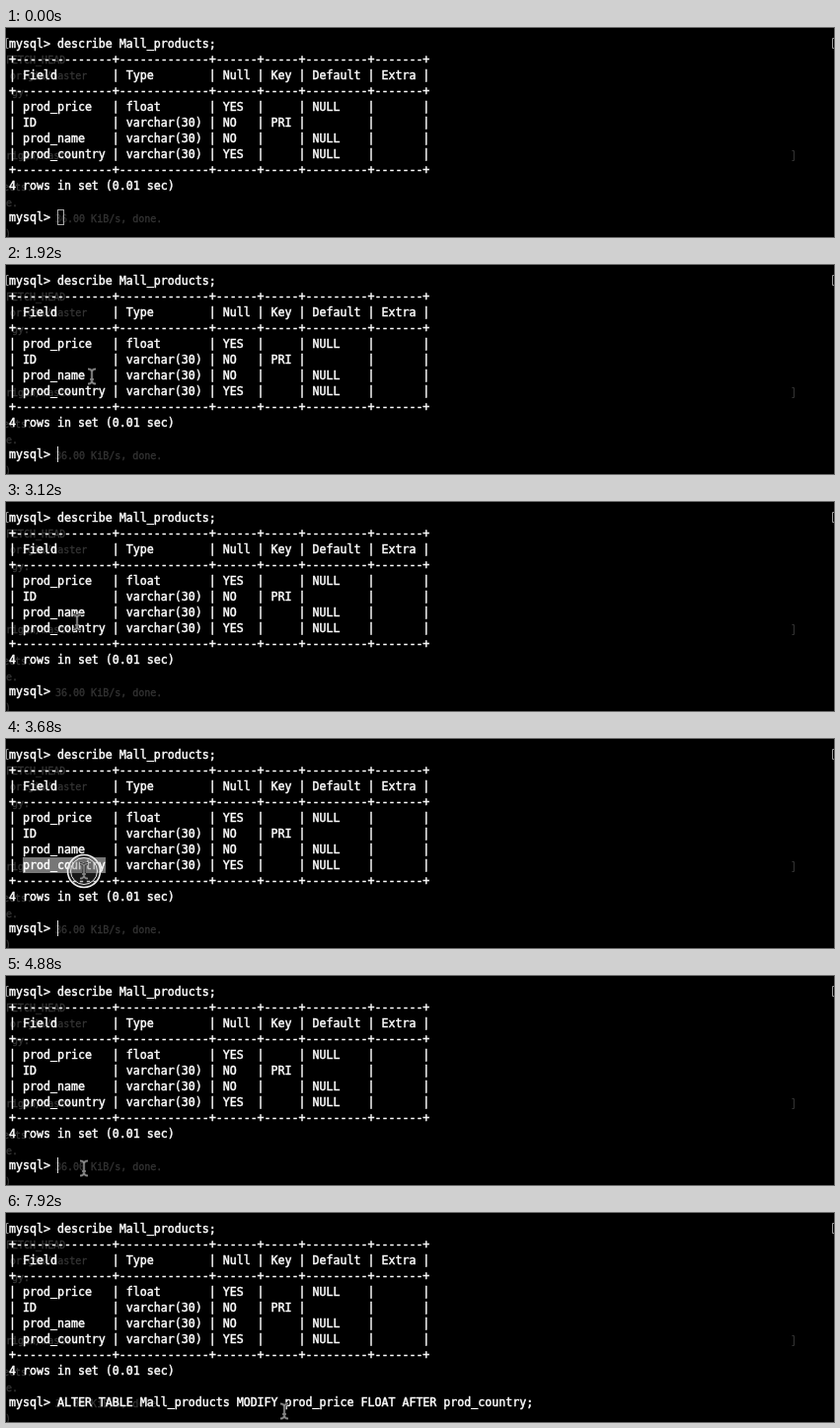
Animation of 839 by 212 pixels, one loop 8000 ms. Source, as an HTML page with a canvas:

```html
<!DOCTYPE html>
<html lang="en">
<head>
<meta charset="utf-8">
<title>Terminal</title>
<style>
  html, body { margin: 0; width: 100%; height: 100%; overflow: hidden; background: #000; }
  canvas { display: block; }
</style>
</head>
<body>
<canvas id="stage" width="839" height="212"></canvas>
<script>
const ctx = document.getElementById('stage').getContext('2d');
const LOOP = 8000, STEP = 80;
const CELL = 7, LINE = 16, LEFT = 3, BASELINE = 20;
const MONO = '"DejaVu Sans Mono", monospace';
const PROMPT_ROW = 11, PASTE_TIME = 5920;
const COMMAND = 'ALTER TABLE Mall_products MODIFY prod_price FLOAT AFTER prod_country;';

const widths = [12, 11, 4, 3, 7, 5];
const rule = '+' + widths.map(w => '-'.repeat(w + 2) + '+').join('');
const tableRow = (...cells) =>
  '|' + widths.map((w, i) => ' ' + (cells[i] || '').padEnd(w) + ' |').join('');

const screen = [
  'mysql> describe Mall_products;',
  rule,
  tableRow('Field', 'Type', 'Null', 'Key', 'Default', 'Extra'),
  rule,
  tableRow('prod_price', 'float', 'YES', '', 'NULL'),
  tableRow('ID', 'varchar(30)', 'NO', 'PRI'),
  tableRow('prod_name', 'varchar(30)', 'NO', '', 'NULL'),
  tableRow('prod_country', 'varchar(30)', 'YES', '', 'NULL'),
  rule,
  '4 rows in set (0.01 sec)'
];

// Faint window showing through the translucent terminal: text, x, baseline
const behind = [
  ['FETCH_HEAD', 0, 36], ['origin/master', 4, 52], ['gy.', 6, 69],
  ['origin/master', -6, 133], ['jects.', -9, 165], ['e.', 0, 181],
  ['36.00 KiB/s, done.', 50, 197], [')', -1, 212]
];

// Mouse path: time, x, y
const path = [
  [400, 190, 205], [800, 128, 178], [1040, 128, 178], [1280, 112, 158],
  [1680, 112, 158], [1920, 87, 113], [2240, 62, 82], [2480, 66, 76],
  [2720, 66, 76], [3120, 72, 122], [3360, 79, 134], [4080, 79, 134],
  [4400, 79, 180], [4640, 79, 195], [7360, 79, 195], [7920, 282, 201]
];

function mouseAt(t) {
  const i = path.findIndex(p => p[0] > t);
  if (i < 0) return path[path.length - 1].slice(1);
  const [t0, x0, y0] = path[i - 1], [t1, x1, y1] = path[i];
  const u = (t - t0) / (t1 - t0), k = u * u * (3 - 2 * u);
  return [x0 + (x1 - x0) * k, y0 + (y1 - y0) * k];
}

const within = (t, from, to) => t >= from && t < to;

// A thin outline gives the glyphs their heavier terminal weight
function drawText(text, x, y, color, weight) {
  ctx.fillStyle = ctx.strokeStyle = color;
  ctx.lineWidth = weight;
  ctx.fillText(text, x, y);
  ctx.strokeText(text, x, y);
}

function drawRow(text, row) {
  drawText(text, LEFT, BASELINE + row * LINE, '#fff', 0.45);
}

function drawBracket(x, y, dir, color) {
  ctx.strokeStyle = color;
  ctx.lineWidth = 1;
  ctx.beginPath();
  ctx.moveTo(x + 2 * dir, y + 0.5);
  ctx.lineTo(x, y + 0.5);
  ctx.lineTo(x, y + 10.5);
  ctx.lineTo(x + 2 * dir, y + 10.5);
  ctx.stroke();
}

function drawBackdrop() {
  ctx.fillStyle = '#000';
  ctx.fillRect(0, 0, 839, 212);
  ctx.font = '10px ' + MONO;
  for (const [text, x, y] of behind) drawText(text, x, y, '#343434', 0.3);
  drawBracket(798.5, 124, -1, '#333');
  drawBracket(0.5, 10, 1, '#999');
  drawBracket(837.5, 10, 1, '#999');
}

function drawCaret(t) {
  const y = 8 + PROMPT_ROW * LINE;
  const x = LEFT + CELL * (7 + (t >= PASTE_TIME ? COMMAND.length : 0));
  if (t < 1680) {
    ctx.strokeStyle = '#aaa';
    ctx.lineWidth = 1;
    ctx.strokeRect(x + 0.5, y + 0.5, 6, 15);
    return;
  }
  const visible = t >= PASTE_TIME
    ? t < 6960 || within(t, 7440, 7920)
    : t < 2040 || Math.floor((t - 2040) / 500) % 2 === 1;
  ctx.fillStyle = '#ddd';
  if (visible) ctx.fillRect(x, y, 1, LINE);
}

function drawClick(x, y) {
  const circle = r => {
    ctx.beginPath();
    ctx.arc(x, y, r, 0, 2 * Math.PI);
  };
  circle(16.5);
  ctx.fillStyle = 'rgba(80,80,80,.3)';
  ctx.fill();
  ctx.strokeStyle = '#eee';
  for (const [radius, weight] of [[16.5, 1.6], [13.5, 1]]) {
    circle(radius);
    ctx.lineWidth = weight;
    ctx.stroke();
  }
}

const beam = new Path2D(
  'M-4-7.5Q-.5-7.5 0-5Q.5-7.5 4-7.5M0-5V5M-4 7.5Q-.5 7.5 0 5Q.5 7.5 4 7.5M-2 3H2');

function drawMouse(x, y) {
  ctx.save();
  ctx.translate(Math.round(x), Math.round(y));
  ctx.strokeStyle = '#222';
  ctx.lineWidth = 3;
  ctx.stroke(beam);
  ctx.strokeStyle = '#888';
  ctx.lineWidth = 1.6;
  ctx.stroke(beam);
  ctx.restore();
}

function draw(t) {
  drawBackdrop();
  if (within(t, 3600, 4640)) {
    ctx.fillStyle = '#777';
    ctx.fillRect(LEFT + 2 * CELL, 8 + 7 * LINE, 12 * CELL, LINE);
  }
  ctx.font = CELL / 0.602 + 'px ' + MONO;
  screen.forEach(drawRow);
  drawRow('mysql> ' + (t >= PASTE_TIME ? COMMAND : ''), PROMPT_ROW);
  drawCaret(t);
  if (t < 400) return;
  const [x, y] = mouseAt(t);
  if (within(t, 3440, 3840) || within(t, 4640, 4800)) drawClick(x, y);
  drawMouse(x, y);
}

const start = performance.now();
function tick() {
  const t = (performance.now() - start) % LOOP;
  draw(Math.floor(t / STEP) * STEP);
  requestAnimationFrame(tick);
}
tick();
</script>
</body>
</html>
```
